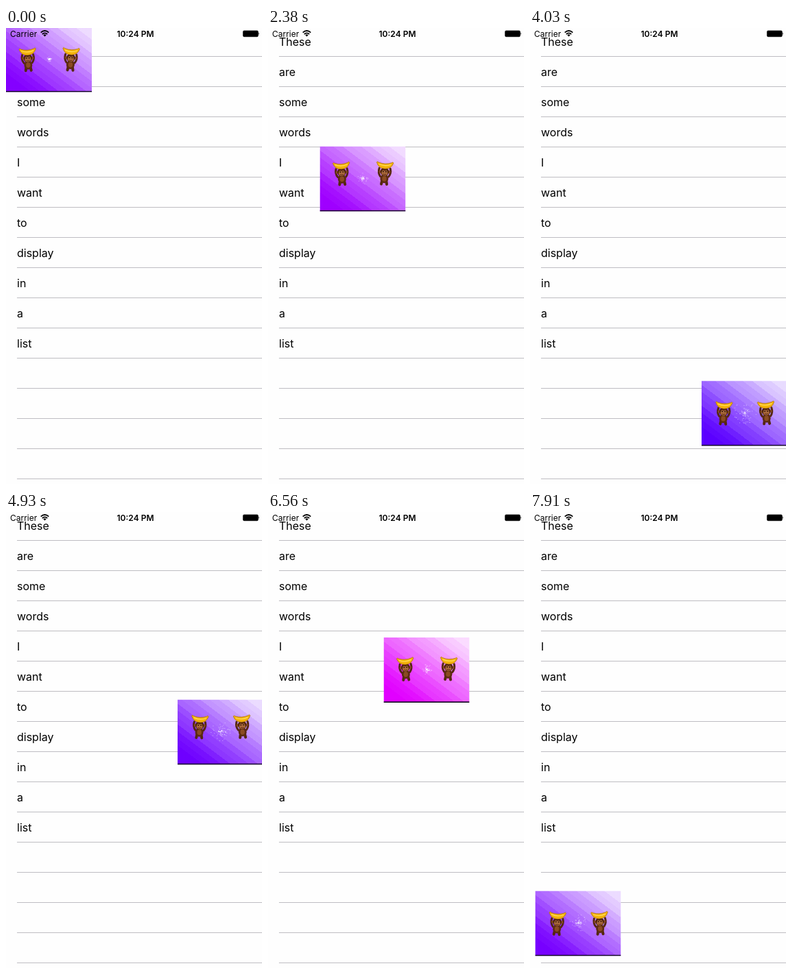
These frames come from a looping animation (373x665 px, 8 s). An HTML page:

```html
<!DOCTYPE html>
<html lang="en">
<head>
<meta charset="utf-8">
<title>Floating video over a list</title>
<style>
  html, body { margin: 0; width: 100%; height: 100%; overflow: hidden; background: #fefefe; }
  svg { display: block; width: 100%; height: 100%; }
  text { font: 16px Inter, Roboto, sans-serif; fill: #000; }
  .status text { font-size: 12px; }
  .status .clock { font-weight: 600; text-anchor: middle; }
</style>
</head>
<body>
<svg viewBox="0 0 373 665">
  <defs>
    <linearGradient id="sky" gradientUnits="userSpaceOnUse" x1="20" y1="92" x2="98" y2="-12"></linearGradient>
    <clipPath id="frame"><rect width="125" height="95"/></clipPath>
    <g id="monkey">
      <g fill="none" stroke="#55270f" stroke-width="3" stroke-linecap="round">
        <path d="M-6 22Q-10 17-8 10M6 22Q10 17 8 10"/>
        <path d="M-3 28L-4 33M3 28L4 33" stroke-width="4"/>
      </g>
      <ellipse cy="25" rx="6" ry="6.5" fill="#5c2b12"/>
      <ellipse cy="25" rx="3.2" ry="4" fill="#8a4b22"/>
      <circle cx="-6.5" cy="15" r="2" fill="#8a4b22"/>
      <circle cx="6.5" cy="15" r="2" fill="#8a4b22"/>
      <circle cy="15" r="6.3" fill="#4e230e"/>
      <ellipse cy="17" rx="4.6" ry="3.6" fill="#a9683a"/>
      <circle cx="-2" cy="14.5" r="1.9" fill="#a9683a"/>
      <circle cx="2" cy="14.5" r="1.9" fill="#a9683a"/>
      <circle cx="-1.9" cy="14.7" r=".9" fill="#1c0a04"/>
      <circle cx="1.9" cy="14.7" r=".9" fill="#1c0a04"/>
      <path d="M-2.4 18.4Q0 19.8 2.4 18.4" fill="none" stroke="#4a1e0c" stroke-width=".8"/>
      <path d="M-12.3 1.5Q-11-.3-9.5 1.6Q0 5 9.5 1.4Q11-.6 12.3 1.5Q9.5 10.6 0 10.6T-12.3 1.5Z"
            fill="#f4b30c" stroke="#a5690a" stroke-width=".7"/>
      <path d="M-9 4Q0 8 9 4" fill="none" stroke="#ffdc55" stroke-width="1.3"/>
    </g>
  </defs>

  <g id="list"></g>

  <g id="card" clip-path="url(#frame)">
    <rect width="125" height="95" fill="url(#sky)"/>
    <path id="faint" stroke="#fff" stroke-opacity=".4" fill="none"/>
    <path id="bright" stroke="#fff" stroke-opacity=".8" fill="none"/>
    <use id="left" href="#monkey"/>
    <use id="right" href="#monkey"/>
    <rect y="93.4" width="125" height="1.6" fill="#0c0418"/>
  </g>

  <g class="status">
    <text x="6" y="12.6">Carrier</text>
    <g fill="none" stroke="#000" stroke-width="1.7">
      <path d="M50.7 6.6Q56.5 1.4 62.3 6.6M52.8 9Q56.5 5.6 60.2 9"/>
      <path d="M54.3 10.2Q56.5 8.3 58.7 10.2L56.5 12.6Z" fill="#000" stroke="none"/>
    </g>
    <text class="clock" x="188.5" y="12.6">10:24 PM</text>
    <rect x="345.4" y="3.9" width="22" height="8.8" rx="1.6" fill="#000" stroke="#000" stroke-width=".6"/>
    <path d="M368.3 6.6q1.6 1.6 0 3.4z"/>
  </g>
</svg>
<script>
const LOOP = 8000, STEP = 149.2;
const $ = id => document.getElementById(id);

// time, x, y of the dragged card
const drag = [
  [0, 0, -1.5], [1720, 0, -1.5], [2240, 58, 132], [2980, 147, 335], [3280, 183, 418],
  [3780, 245, 554], [3880, 250, 557], [4330, 250, 428], [4930, 250, 272], [5520, 250, 98],
  [5670, 250, 54], [5820, 247, 18], [5960, 242, 16], [6710, 151, 223], [7160, 99, 342],
  [7760, 23, 516], [7910, 7, 553], [8000, 7, 553]
];
// time, hue of the backdrop
const hues = [
  [0, 271], [1640, 293], [2980, 265], [3950, 261], [4930, 266],
  [5960, 287], [6560, 293], [7160, 289], [7910, 268], [8000, 268]
];

function sample(keys, t) {
  const i = Math.max(1, keys.findIndex(k => k[0] >= t));
  const a = keys[i - 1], b = keys[i], u = (t - a[0]) / (b[0] - a[0]);
  return a.slice(1).map((v, n) => v + (b[n + 1] - v) * u);
}

function random(seed) {
  return () => {
    seed = (seed * 16807) % 2147483647;
    return seed / 2147483647;
  };
}

const words = "These are some words I want to display in a list".split(" ");
let rows = "";
for (let i = 0; i < 15; i++) {
  rows += `<rect x="16" y="${41 + 44 * i}" width="357" height="1" fill="#bebdc2"/>`;
  if (words[i]) rows += `<text x="16" y="${26 + 44 * i}">${words[i]}</text>`;
}
$("list").innerHTML = rows;

const BANDS = 16;
function paintSky(hue) {
  let stops = "";
  for (let i = 0; i < BANDS; i++) {
    const light = 50 + 43 * Math.max(0, (i - 1) / (BANDS - 2)) + (i % 3 === 1 ? 1.5 : 0);
    const color = `hsl(${hue} 100% ${light}%)`;
    for (const edge of [i, i + 1])
      stops += `<stop offset="${edge / BANDS}" stop-color="${color}"/>`;
  }
  $("sky").innerHTML = stops;
}

function sparks(seed, count, radius, size) {
  const rnd = random(seed);
  let d = "";
  for (let i = 0; i < count; i++) {
    const a = rnd() * Math.PI * 2, r = radius * rnd();
    d += `M${(62.5 + r * Math.cos(a)).toFixed(1)} ${(47 + r * Math.sin(a)).toFixed(1)}h${size}`;
  }
  return d;
}

function draw(t, frame) {
  const [x, y] = sample(drag, t).map(v => Math.round(v * 2) / 2);
  $("card").setAttribute("transform", `translate(${x} ${y})`);
  paintSky(sample(hues, t)[0]);

  const hop = 8 * Math.max(0, Math.cos((t - 4930) / 318.6 * 2 * Math.PI)) ** 4;
  const tilt = frame % 2 ? 3 : -3;
  $("left").setAttribute("transform", `translate(32 ${30.5 - hop}) rotate(${tilt} 0 18)`);
  $("right").setAttribute("transform", `translate(94.3 ${30 - hop}) rotate(${-tilt} 0 18)`);

  const radius = 4 + 16 * (t % 1050) / 1050;
  $("faint").setAttribute("d", sparks(frame * 97 + 11, 20 + radius * 2, radius, 1.2));
  $("bright").setAttribute("d", sparks(frame * 53 + 7, 18, radius * .45, 1));
}

let last = -1;
function tick(now) {
  const frame = Math.floor((now % LOOP + 12) / STEP);
  if (frame !== last) {
    last = frame;
    draw(Math.min(frame * STEP, LOOP), frame);
  }
  requestAnimationFrame(tick);
}
draw(0, 0);
requestAnimationFrame(tick);
</script>
</body>
</html>
```
